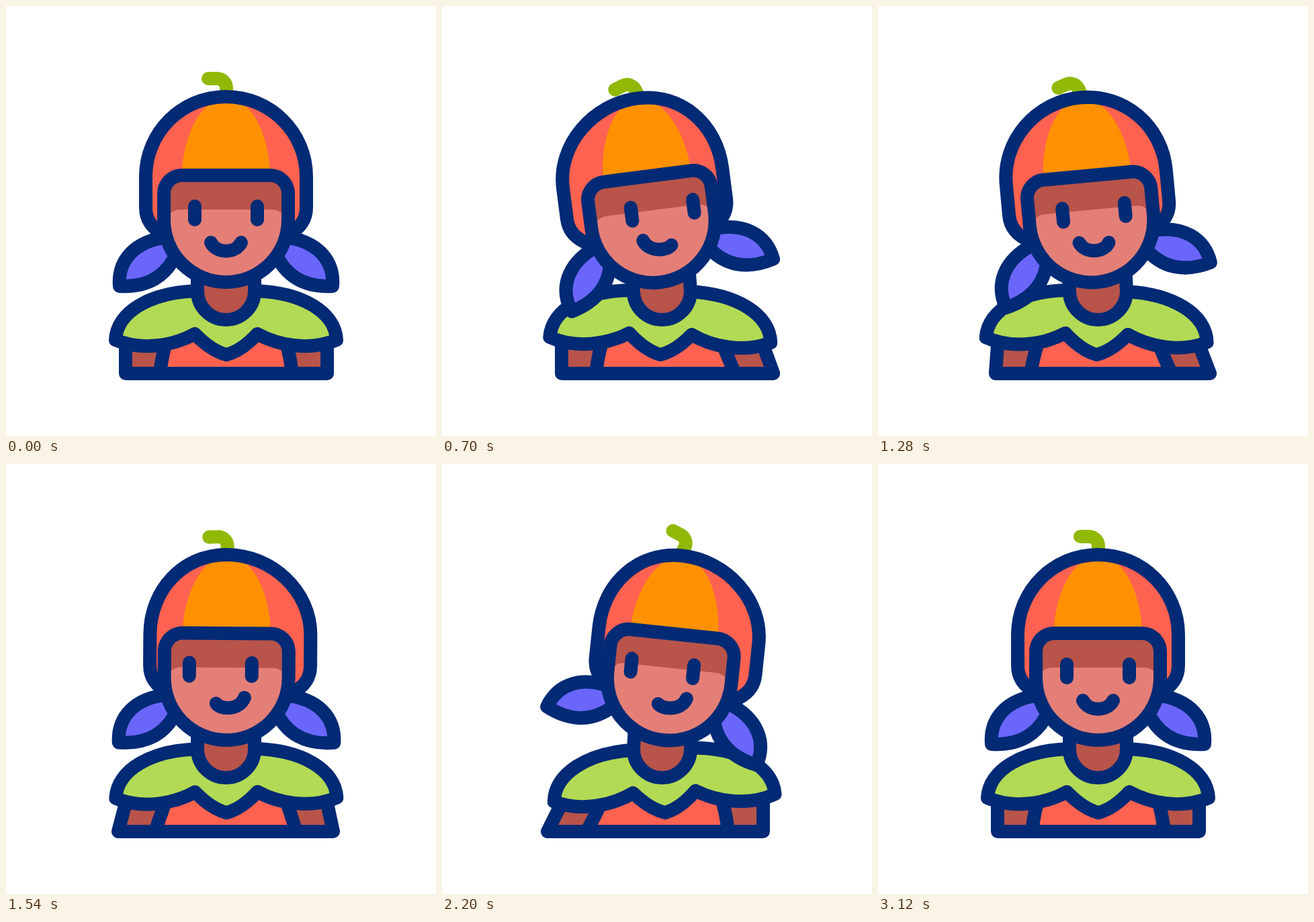
Write an HTML page that moves like this. It is 640 by 640 pixels and loops after 3600 ms.

```html
<!DOCTYPE html>
<html lang="en">
<head>
<meta charset="utf-8">
<title>Looking around</title>
<style>
  html, body { margin: 0; width: 100%; height: 100%; overflow: hidden; background: #fff; }
  svg { display: block; width: 100vw; height: 100vh; }
  .line { fill: none; stroke: #022a75; stroke-width: 20; stroke-linecap: round; stroke-linejoin: round; }
  .blue { fill: #6b66fa; }
  .lime { fill: #b2da54; }
  .red { fill: #ff6250; }
  .dark { fill: #b8544a; }
</style>
</head>
<body>
<svg viewBox="0 0 640 640">
  <path id="arms" class="dark"/>
  <path id="shirt" class="red"/>
  <path id="sleeves" class="line"/>
  <path id="torso" class="line"/>
  <path id="collar" class="line lime" d="M285 424C215 426 165 455 163 497C203 514 250 505 281 488Q305 513 328 519Q351 513 374 488C405 505 452 514 492 497C490 455 440 426 370 424Z"/>
  <path id="neck" class="line dark"/>
  <g id="head">
    <path id="leftTail" class="line blue"/>
    <path id="rightTail" class="line blue"/>
    <path id="stem" fill="none" stroke="#91b806" stroke-width="20" stroke-linecap="round" d="M301 108H314A14 14 0 0 1 328 122V130"/>
    <path id="shell" class="red"/>
    <path fill="#ff9100" d="M262 252C262 205 282 158 306 144Q328 130 350 144C374 158 393 205 393 252Z"/>
    <path id="shellLine" class="line"/>
    <path id="skin" fill="#e47f77"/>
    <path class="dark" d="M240 320V265Q242 254 262 252H393Q413 254 415 265V320Q413 303 395 303H260Q242 303 240 320Z"/>
    <path id="rim" class="line"/>
    <path id="eyes" class="line" d="M281 298V318M374 298V318"/>
    <path id="mouth" class="line"/>
  </g>
</svg>
<script>
const $ = id => document.getElementById(id);
const draw = (d, ...ids) => ids.forEach(id => $(id).setAttribute('d', d));
const place = (id, transform) => $(id).setAttribute('transform', transform);
const clamp = k => Math.min(1, Math.max(0, k));
const ease = k => k * k * (3 - 2 * k);

// Three moves, each [start, duration]: to the left, to the right, back to rest.
const lean = [[180, 660], [1000, 950], [2200, 620]];
const glance = [[120, 280], [1000, 700], [2200, 420]];
const sway = (t, moves, left, right) => [left, right, 0].reduce((value, goal, i) => {
  const [start, duration] = moves[i];
  return value + (goal - value) * ease(clamp((t - start) / duration));
}, 0);

draw('M240 344C190 350 166 380 169 417C210 419 240 403 255 365Z', 'leftTail', 'rightTail');
draw('M262 252H393A27 27 0 0 1 420 279V318.5A92.5 92.5 0 0 1 235 318.5V279A27 27 0 0 1 262 252Z', 'skin', 'rim');

function drawBody(t) {
  const l = sway(t, lean, 0, -21), r = sway(t, lean, 19, 0);
  const leftHem = 229 + l * .66, rightHem = 426 + r * .66;
  draw(`M178 495V505L${178 + l} 547H${478 + r}L478 505V495`, 'arms', 'torso');
  draw(`M240 490Q233 515 ${leftHem} 547H${rightHem}Q422 515 415 490Z`, 'shirt');
  draw(`M240 495Q233 515 ${leftHem} 547M415 495Q422 515 ${rightHem} 547`, 'sleeves');
  place('collar', `rotate(${(l + r) * .095} 328 390)`);
}

function drawHead(t) {
  const late = t - 50; // loose parts trail the head
  const angle = sway(t, lean, -8.3, 6);
  const wobble = Math.sin(2 * Math.PI * clamp((t - 2420) / 700));
  const stem = sway(late, lean, -33, 27) - 17 * wobble;
  const leftTail = sway(late, lean, -30, 30);
  const rightTail = sway(late, lean, -25, 19) - 19 * Math.max(0, wobble);

  place('head', `rotate(${angle} 328 423)`);
  place('stem', `rotate(${stem - angle} 328 127)`);
  place('leftTail', `rotate(${leftTail - angle} 248 355)`);
  place('rightTail', `translate(655) scale(-1 1) rotate(${angle - rightTail} 248 355)`);
  draw(`M${285 + angle * .3} 395L285 424.5A42.5 42.5 0 0 0 370 424.5L${370 + angle * .3} 395`, 'neck');
}

function drawFace(t) {
  const side = sway(t, glance, -1, 1), amount = Math.abs(side);

  // The helmet's sides slide while its crown stays put.
  const a = 208 + side * 7.3, b = 447 + side * 7.3;
  draw(`M${a + 28} 341C${a + 9} 331 ${a} 318 ${a} 300V254C${a} 188 261.5 135 327.5 135`
    + `S${b} 188 ${b} 254V300C${b} 318 ${b - 9} 331 ${b - 28} 341L328 360Z`, 'shell', 'shellLine');

  place('eyes', `translate(${2 * amount - 14 * side} ${-3 * amount})`);
  const x = 327.5 + 3 * side + 5 * amount, half = 22.5 - 2 * amount;
  const slant = 6 * side, dip = 369 - 3.5 * amount;
  draw(`M${x - half} ${352 + slant}C${x - 14} ${dip} ${x + 14} ${dip} ${x + half} ${352 - slant}`, 'mouth');
}

function frame() {
  const t = performance.now() % 3600;
  drawBody(t - 50);
  drawHead(t);
  drawFace(t);
  requestAnimationFrame(frame);
}
frame();
</script>
</body>
</html>
```
